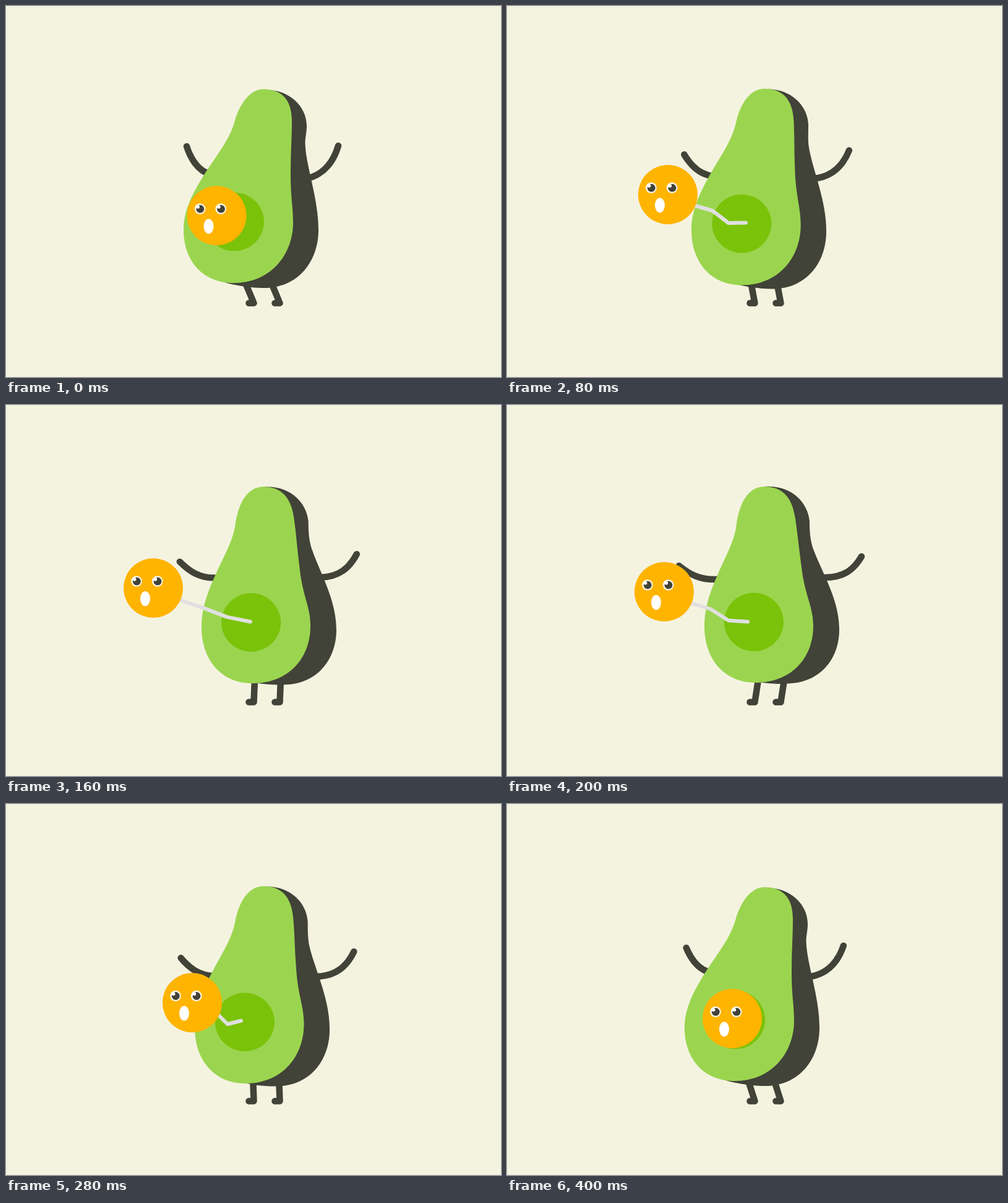
An HTML page for the animation above (440 ms loop, 800x600 px).

```html
<!DOCTYPE html>
<html lang="en">
<head>
<meta charset="utf-8">
<title>Avocado dance</title>
<style>
html, body { margin: 0; width: 100%; height: 100%; overflow: hidden; background: #f4f3e0; }
svg { display: block; width: 100vw; height: 100vh; }
.limb { fill: none; stroke: #414238; stroke-width: 10.5; stroke-linecap: round; stroke-linejoin: round; }
</style>
</head>
<body>
<svg viewBox="0 0 800 600">
  <rect width="800" height="600" fill="#f4f3e0"/>
  <path id="legs" class="limb"/>
  <path id="armL" class="limb"/>
  <path id="armR" class="limb"/>
  <path id="skin" fill="#414238"/>
  <path id="flesh" fill="#9bd54f"/>
  <ellipse id="hole" rx="48" ry="47.3" fill="#7bc20a"/>
  <polyline id="spring" fill="none" stroke="#e0e0e0" stroke-width="6" stroke-linecap="round" stroke-linejoin="round"/>
  <g id="pit">
    <circle r="48" fill="#ffb400"/>
    <g id="eye" transform="translate(-27 -11)">
      <circle r="8.8" fill="#fbf6ea"/>
      <circle cx=".3" cy=".2" r="6.4" fill="#414238"/>
      <circle cx="-3.4" cy="-3.2" r="2.9" fill="#fff"/>
    </g>
    <use href="#eye" x="33.7"/>
    <ellipse cx="-13" cy="17.3" rx="8" ry="12" fill="#fff"/>
  </g>
</svg>
<script>
const STEP = 40, COUNT = 11;
const el = id => document.getElementById(id);
const set = (id, attrs) => {
  for (const name in attrs) el(id).setAttribute(name, attrs[name]);
};
const lerp = (a, b, t) => a + (b - a) * t;
const arch = t => 4 * t * (1 - t);

// Each shape has a left-leaning and a right-leaning pose.
const poses = {
  flesh: [
    'M416 134.5C393 134.5 377 161 370 185C362 216 340 242 322 270C302 302 287 330 287 362C287 412 318 448 368 448C427 448 464 403 464 350C464 325 460 310 460 272C460 240 462 215 462 186C462 152 446 134.5 416 134.5Z',
    'M416 132C390 132 376 158 371 192C368 222 350 250 338 280C326 308 319 332 319 357C319 410 350 449 402 449C458 449 495 411 495 357C495 325 481 308 476 262C472 235 470 210 466 184C461 150 446 132 416 132Z'
  ],
  skin: [
    'M416 136C454 133 486 160 486 194C486 205 483.5 212 483.5 222C484.5 260 505 310 505 362C505 415 470 456 418 456C390 456 360 450 345 444L380 300Z',
    'M416 132C458 129 486 156 489 188C489 212 491.5 222 495 233C510 273 537 315 537 363C537 412 505 449 455 450.5C440 451.5 425 451 405 448L412 300Z'
  ],
  armL: [
    'M292 227C298 246 310 266 328 271',
    'M278 260C293 272 312 285 345 281.5'
  ],
  armR: [
    'M537 226C530 250 515 272 487 279',
    'M573 245C560 267 543 280 510 279'
  ]
};

const number = /[\d.]+/g;
function blend(id, t, offset) {
  const [a, b] = poses[id];
  const ends = b.match(number);
  let i = 0;
  const d = a.replace(number, n => {
    const v = lerp(+n, +ends[i], t);
    return (v + offset(v, i++ % 2 === 1)).toFixed(2);
  });
  set(id, { d });
}

// Centre of the pit on each step.
const track = [
  [340.5, 339], [300, 321.5], [260, 305], [232.5, 293.7], [238, 296], [254, 302],
  [277, 311.5], [301, 321.3], [326.5, 331.3], [348, 340.3], [364, 347]
];

// Spring joints by horizontal pit position: x, then three points.
const joints = [
  [232.5, 315, 327.5, 357, 341, 397, 350.5],
  [254, 329, 330, 358, 348.5, 389, 350.5],
  [260, 332, 331, 358, 351, 386, 350.5],
  [301, 340, 338, 358, 356, 380, 350.5],
  [326.5, 335, 345, 357, 362, 376, 350.5]
];

function springAt(x) {
  const last = joints.length - 1;
  if (x >= joints[last][0]) return joints[last].slice(1);
  let i = 0;
  while (i < last - 1 && x > joints[i + 1][0]) i++;
  const a = joints[i], b = joints[i + 1];
  const t = (x - a[0]) / (b[0] - a[0]);
  return a.slice(1).map((v, n) => lerp(v, b[n + 1], t));
}

const bodyLean = k => k <= 5
  ? (1 - Math.cos(Math.PI * k / 5)) / 2
  : (1 + Math.cos(Math.PI * ((k - 5) / 5) ** 0.85)) / 2;
const limbLean = k => k <= 5 ? k / 5 : (11 - k) / 6;

function draw(ms) {
  const k = Math.floor(ms / STEP) % COUNT;
  const body = bodyLean(k), limb = limbLean(k);

  const sag = (v, isY) => isY && v > 250 ? (v - 250) / 200 * 3.6 * arch(body) : 0;
  blend('flesh', body, sag);
  blend('skin', body, sag);
  blend('armL', limb, () => 0);
  blend('armR', limb, (v, isY) => isY ? 0 : 1.5 * arch(limb));

  const hip = lerp(387, 405.5, limb);
  const leg = dx => `M${hip + dx} 448L${400.5 + dx} 480.5H${392.5 + dx}`;
  set('legs', { d: leg(0) + leg(42) });

  set('hole', { cx: lerp(369, 399, body), cy: lerp(349, 351, body) + 2.5 * arch(body) });

  const [x, y] = track[k];
  set('spring', { points: [x, y + 5, ...springAt(x)].join(' ') });
  set('pit', { transform: `translate(${x} ${y})` });
}

function tick() {
  draw(performance.now());
  requestAnimationFrame(tick);
}
tick();
</script>
</body>
</html>
```
